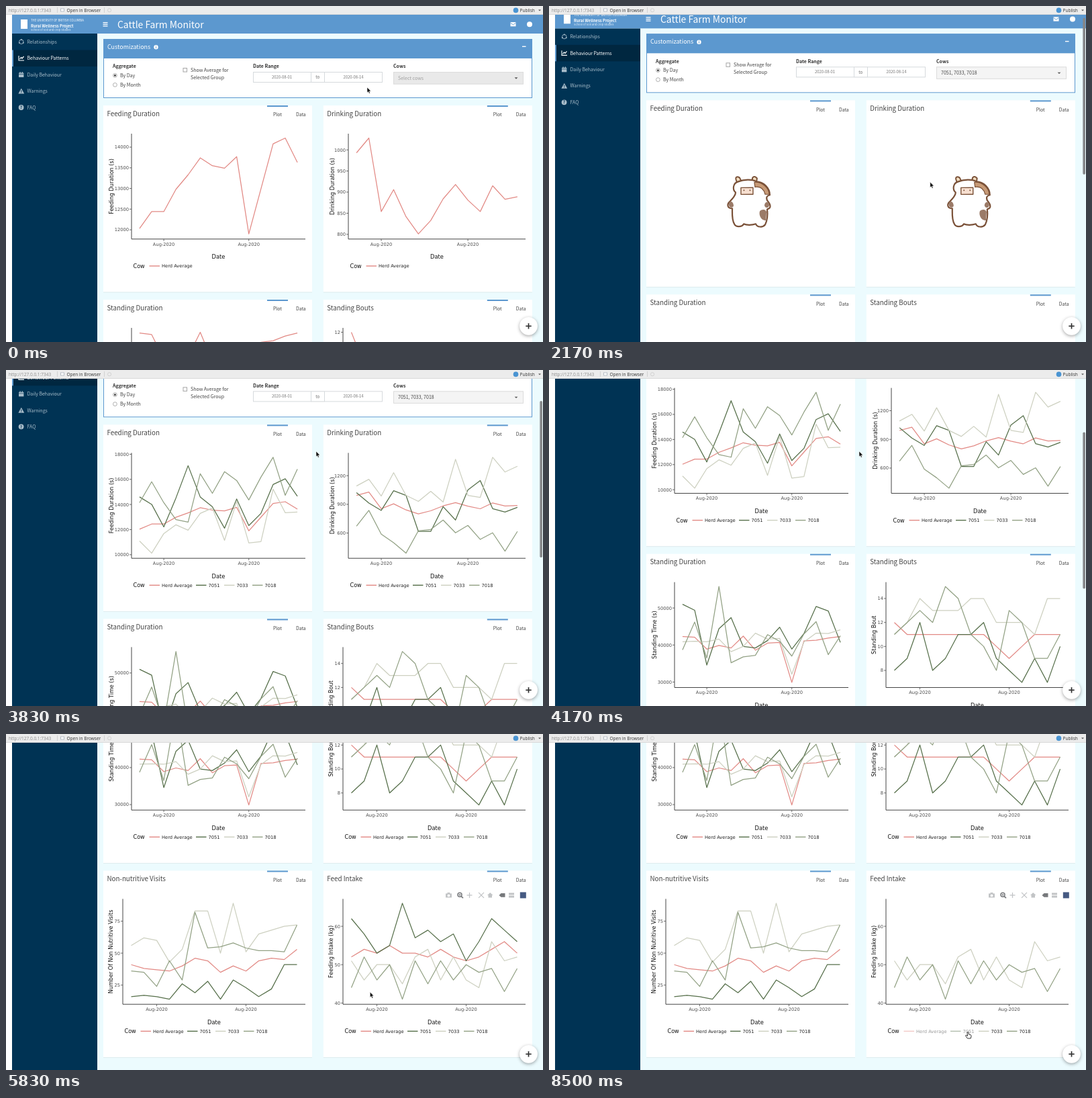
Write an HTML page with a canvas that moves like this. It is 800x500 px and loops after 8.88 s.

```html
<!DOCTYPE html>
<html lang="en">
<head>
<meta charset="utf-8">
<title>Cattle Farm Monitor</title>
<style>
html, body { margin: 0; width: 100%; height: 100%; overflow: hidden; background: #fff; }
canvas { display: block; width: 800px; height: 500px; }
</style>
</head>
<body>
<canvas id="stage" width="800" height="500"></canvas>
<script>
const ctx = document.getElementById('stage').getContext('2d');
const LOOP = 8880, STEP = 1000 / 6;
const UI = '"Noto Sans CJK SC", "Noto Sans CJK JP", "Noto Sans CJK", Lato, sans-serif';
const PLOT = '"DejaVu Sans", sans-serif';
const BAR = '"Open Sans", sans-serif';
const BLUE = '#5c98cf', NAVY = '#003354', PAGE = '#ecfbfe';
const COLORS = ['#e28984', '#566f4a', '#cdd0c0', '#92a184'];
const NAMES = ['Herd Average', '7051', '7033', '7018'];
const COWS = ('8015 7189 7159 7146 7065 7051 7043 7039 7037 7033 7030 7029 7027 ' +
  '7024 7023 7022 7019 7018 7010 6134 6131 6130 6129 6126 6050').split(' ');
const PICKS = [[830, '7051'], [1170, '7033'], [1670, '7018']];

const SCROLL = [[500, 0], [670, 15.5], [2000, 15.5], [2330, 0], [3330, 0], [3670, 30], [4000, 104],
  [4170, 164.5], [4500, 400], [4670, 484], [4830, 522], [5000, 522.6]];
const POINTER = [[0, 538, 121], [170, 560, 116], [500, 625, 106], [670, 625, 160], [830, 625, 217],
  [1170, 625, 276], [1330, 625, 287.5], [1670, 625, 390], [1830, 625, 390], [2330, 540, 200],
  [2670, 462, 121], [5170, 462, 121], [5670, 525, 330], [6000, 560, 439], [6500, 565, 440],
  [7000, 622, 443], [7170, 625, 444], [8000, 624.5, 443.5], [8500, 624, 443]];

const charts = [];
function chart(title, axis, left, steps, unit, ...data) {
  const i = charts.length;
  charts.push({ title, axis, left, steps, unit, data, col: i % 2, top: (i >> 1) * 289 });
}
chart('Feeding Duration', 'Feeding Duration (s)', 187, [5, 20], 100,
  [120.3, 124.4, 124.4, 129.8, 133.3, 137.4, 135.5, 134.9, 137.7, 119, 129.9, 140.8, 142.2, 136.3],
  [146, 140.1, 122.1, 145.2, 170.9, 146, 138.2, 121.1, 144.4, 123.2, 132.9, 155.9, 160.5, 146.5],
  [110.9, 101.2, 116.8, 123.8, 119.5, 132.9, 137.2, 111.4, 142.5, 109.3, 110.4, 152.2, 133.4, 133.9],
  [141.4, 158.1, 141.4, 128, 125.9, 164.5, 148.9, 166.1, 159.1, 143.6, 161.8, 177.6, 147.3, 168.2]);
chart('Drinking Duration', 'Drinking Duration (s)', 510, [50, 300], 1,
  [993, 1028, 854, 906, 842, 801, 833, 884, 918, 881, 854, 915, 883, 889],
  [1022, 914, 837, 1043, 994, 617, 617, 876, 736, 1050, 1148, 855, 820, 869],
  [1092, 1162, 987, 1231, 994, 931, 1036, 924, 1371, 994, 973, 1392, 1238, 1298],
  [673, 837, 589, 499, 390, 624, 638, 736, 603, 680, 534, 603, 411, 617]);
chart('Standing Duration', 'Standing Time (s)', 187, [5, 10], 1000,
  [42.3, 42.1, 38.9, 39.9, 39.2, 42.4, 38.6, 40.5, 40.7, 29.9, 41.1, 41.3, 41.9, 42.3],
  [51, 49.4, 34.6, 44.4, 47.4, 39.6, 39.2, 41.2, 44.8, 38.9, 43.1, 50.4, 49.2, 40.7],
  [40.9, 41, 40.9, 41.6, 38.2, 39.6, 43.2, 41.6, 41.8, 32.1, 40.8, 43.2, 43.1, 44.1],
  [38.7, 46.2, 36.5, 55.8, 35.2, 36.8, 37.2, 42.8, 41, 37, 43, 46.3, 37.4, 42.5]);
chart('Standing Bouts', 'Standing Bout', 502, [1, 2], 1,
  [12, 11, 11, 11, 11, 11, 11, 11, 10, 9, 10, 11, 11, 11],
  [8, 9, 12, 8, 9, 11, 11, 12, 9, 8, 7, 9, 7, 10],
  [11, 12, 14, 13, 13, 13, 14, 14, 12, 12, 12, 11, 14, 14],
  [11, 12, 13, 12, 15, 14, 11, 10, 8, 13, 12, 9, 9, 11]);
chart('Non-nutritive Visits', 'Number Of Non Nutritive Visits', 174, [5, 25], 1,
  [41, 38, 37, 36, 40, 46, 44, 35, 40, 36, 44, 46, 45, 53],
  [16, 17, 16, 14, 26, 19, 28, 14, 29, 23, 16, 22, 41, 41],
  [56, 62, 60, 43, 53, 83, 83, 50, 89, 51, 65, 68, 71, 72],
  [36, 35, 24, 44, 29, 82, 54, 55, 58, 54, 52, 52, 51, 72]);
chart('Feed Intake', 'Feeding Intake (kg)', 502, [1, 10], 1,
  [52, 54, 53, 55, 53, 53, 52, 54, 52, 51, 52, 54, 56, 53],
  [62, 58, 53, 55, 66, 57, 59, 56, 58, 51, 56, 62, 59, 56],
  [51, 46, 50, 50, 45, 52, 54, 46, 52, 46, 44, 56, 51, 52],
  [44, 52, 46, 50, 41, 51, 45, 51, 46, 50, 48, 49, 43, 49]);

function track(keys, t, k = 1) {
  if (t <= keys[0][0]) return keys[0][k];
  for (let i = 1; i < keys.length; i++) {
    const a = keys[i - 1], b = keys[i];
    if (t < b[0]) return a[k] + (b[k] - a[k]) * (t - a[0]) / (b[0] - a[0]);
  }
  return keys[keys.length - 1][k];
}

// Text is placed by the vertical centre of its capitals.
function text(s, x, y, size, color, font = UI, align = 'left', weight = 400) {
  ctx.font = `${weight} ${size}px ${font}`;
  ctx.fillStyle = color;
  ctx.textAlign = align;
  ctx.fillText(s, x, y + size * 0.36);
}
const bold = (s, x, y, size, color) => text(s, x, y, size, color, UI, 'left', 700);

function rect(x, y, w, h, fill, stroke) {
  if (fill) { ctx.fillStyle = fill; ctx.fillRect(x, y, w, h); }
  if (stroke) { ctx.strokeStyle = stroke; ctx.lineWidth = 1; ctx.strokeRect(x + .5, y + .5, w - 1, h - 1); }
}
function disc(x, y, r, fill, stroke, width = 1) {
  ctx.beginPath();
  ctx.arc(x, y, r, 0, Math.PI * 2);
  if (fill) { ctx.fillStyle = fill; ctx.fill(); }
  if (stroke) { ctx.strokeStyle = stroke; ctx.lineWidth = width; ctx.stroke(); }
}
function line(pts, color, width = 1) {
  ctx.beginPath();
  pts.forEach(p => ctx.lineTo(p[0], p[1]));
  ctx.strokeStyle = color;
  ctx.lineWidth = width;
  ctx.stroke();
}
function poly(pts, fill) {
  ctx.beginPath();
  pts.forEach(p => ctx.lineTo(p[0], p[1]));
  ctx.closePath();
  ctx.fillStyle = fill;
  ctx.fill();
}
function shape(d, fill, stroke, width) {
  const p = new Path2D(d);
  if (fill) { ctx.fillStyle = fill; ctx.fill(p); }
  if (stroke) { ctx.strokeStyle = stroke; ctx.lineWidth = width; ctx.stroke(p); }
}
const caret = (x, y, w, color) => poly([[x - w, y - w / 2], [x + w, y - w / 2], [x, y + w / 2]], color);

function topBar() {
  rect(0, 0, 800, 13, '#ececec');
  rect(0, 12, 800, 1, '#d9d9d9');
  text('http://127.0.0.1:7343', 4, 6.3, 6.5, '#8b8b8b', BAR);
  rect(76, 2, 1, 8, '#d2d2d2');
  rect(81, 3.5, 6, 5, '#fff', '#b5bcc4');
  text('Open in Browser', 90.5, 6.3, 6.5, '#333', BAR);
  rect(146, 2, 1, 8, '#d2d2d2');
  disc(154, 6.3, 2.6, null, '#d2d2d2');
  disc(759.5, 6.4, 3.8, '#4a94d2');
  text('Publish', 765.5, 6.3, 6.5, '#333', BAR);
  caret(795, 6.6, 2, '#555');
}

function header() {
  rect(9, 13, 791, 28, BLUE);
  rect(22, 20, 10, 14, '#fff');
  text('THE UNIVERSITY OF BRITISH COLUMBIA', 37, 21, 4.3, '#fff');
  bold('Rural Wellness Project', 37, 29.5, 5.8, '#fff');
  text('School of Soil and Crop Studies', 37, 35.6, 4.1, '#e4eff8');
  for (let i = 0; i < 3; i++) rect(144.5, 24 + i * 2.6, 7, 1.3, '#fff');
  text('Cattle Farm Monitor', 166, 28, 13.9, '#fff');
  rect(751.5, 24, 8, 6.3, '#fff');
  line([[751.5, 25], [755.5, 28], [759.5, 25]], BLUE, .9);
  disc(780, 27.2, 4, '#fff');
}

function sidebar() {
  rect(9, 41, 127, 1000, NAVY);
  rect(9, 65.5, 127, 24.5, '#002740');
  rect(9, 65.5, 2, 24.5, BLUE);
  const items = ['Relationships', 'Behaviour Patterns', 'Daily Behaviour', 'Warnings', 'FAQ'];
  items.forEach((s, i) => text(s, 31.5, 53.3 + i * 24.45, 7, i === 1 ? '#fff' : '#a9bdca'));
  const c = '#a9bdca';
  disc(22.8, 53.3, 3.2, null, c, .9);
  [[0, -3.2], [3, 1.5], [-3, 1.5]].forEach(p => disc(22.8 + p[0], 53.3 + p[1], 1, c));
  line([[19, 74], [19, 81], [27, 81]], '#fff', 1.1);
  line([[20.5, 79], [22.5, 76.5], [24, 78], [26.5, 75]], '#fff', 1.2);
  rect(19, 99.5, 7.4, 6.5, c);
  rect(20.5, 98, 1.2, 2, c);
  rect(23.7, 98, 1.2, 2, c);
  line([[19, 101.5], [26.4, 101.5]], NAVY, .6);
  poly([[22.8, 122.4], [27.2, 130.4], [18.4, 130.4]], c);
  rect(22.3, 125.2, 1, 2.6, NAVY);
  rect(22.3, 128.4, 1, 1, NAVY);
  disc(22.6, 151, 3.9, c);
  text('?', 22.6, 151, 6, NAVY, UI, 'center', 700);
}

function picked(t) {
  return PICKS.filter(p => t >= p[0]).map(p => p[1]);
}

function filters(t) {
  const open = t >= 500 && t < 2000, cows = picked(t);
  rect(145, 49, 639, 88, '#fff', BLUE);
  rect(145, 49, 639, 29, BLUE);
  text('Customizations', 151, 60.6, 8.95, '#fff');
  disc(223.5, 61.3, 3.2, '#fff');
  rect(223, 60.8, 1, 2.3, BLUE);
  rect(223, 59.2, 1, 1, BLUE);
  rect(769, 59.6, 5.5, 1.4, '#fff');
  bold('Aggregate', 159, 89.7, 7, '#333');
  ['By Day', 'By Month'].forEach((s, i) => {
    const y = 103.3 + i * 14;
    disc(162.4, y, 2.9, '#fff', '#9a9a9a', .8);
    if (!i) disc(162.4, y, 1.5, '#444');
    text(s, 170, y, 7, '#444');
  });
  rect(263.5, 92, 6.5, 6.5, '#fff', '#a5a5a5');
  text('Show Average for', 275, 95.2, 7, '#444');
  text('Selected Group', 275, 106, 7, '#444');
  bold('Date Range', 368, 89.7, 7, '#333');
  rect(368, 98, 193, 16, '#fff', '#d6dadd');
  rect(454, 98, 21, 16, '#fff', '#d6dadd');
  text('2020-08-01', 411, 106, 5.9, '#777', UI, 'center');
  text('to', 464.2, 106, 6.2, '#666', UI, 'center');
  text('2020-08-14', 517.5, 106, 5.9, '#777', UI, 'center');
  bold('Cows', 577, 89.7, 7, '#333');
  const fill = open ? '#e4e4e4' : t < 500 ? '#e9e9e9' : '#f4f4f4';
  rect(577, 98, 192 + (open ? 0 : 2), 18.5, fill, open ? '#b0bcc4' : '#dcdcdc');
  text(cows.length ? cows.join(', ') : 'Select cows', 584, 107.3, 7, cows.length ? '#444' : '#a0a0a0');
  caret(760, 107.5, 2.4, '#555');
}

function menu(t) {
  const cows = picked(t), active = cows[cows.length - 1];
  rect(578, 117, 191, 600, '#fff', '#e2e4e5');
  rect(583, 123, 181, 17, '#f5f5f5', '#e0e0e0');
  rect(673, 123, 1, 17, '#e0e0e0');
  text('Select All', 627.5, 131.5, 6.2, '#444', UI, 'center');
  text('Deselect All', 718, 131.5, 6.2, '#444', UI, 'center');
  rect(583, 141, 181, 13, '#f3f3f3');
  text('48 cows with data in date range', 589, 148.5, 5.9, '#777');
  COWS.forEach((id, i) => {
    const y = 162 + i * 14.45, on = id === active;
    if (on) rect(578, y - 7.3, 191, 14.5, '#e2e2e2');
    text(id, 595, y, 7, on ? '#333' : '#777');
    if (cows.includes(id)) line([[747.8, y], [750.2, y + 2.3], [755, y - 2.5]], on ? '#222' : '#777', 1.7);
  });
}

function mascot(cx, cy, t) {
  const ink = '#7a5138', tan = '#c79a76';
  ctx.save();
  ctx.translate(cx, cy);
  ctx.rotate(Math.sin((t - 1330) / 260) * .04);
  ctx.lineJoin = 'round';
  shape('M-17-28C-22-36-19-39-14-36L-11-30ZM5-31C4-38 9-39 12-35L11-28Z', '#f0dcc0', ink, 2);
  shape('M-16-30C-8-33 4-34 11-30C22-30 31-20 31-10C27-9 25-7 27-2C33 5 33 10 27 11' +
    'C28 20 27 28 24 34C20 39 12 38 10 33C4 35-4 35-8 33C-11 38-20 38-22 33C-26 26-25 18-25 10' +
    'C-32 10-34 4-28-1C-24-6-20-9-20-14C-25-18-24-28-16-30Z', '#fff', ink, 2.2);
  shape('M8-29C20-30 30-20 30-11L24-11C22-20 16-23 9-22Z', tan, ink, 1.2);
  shape('M-30 2C-27-3-23 1-23 6C-25 10-31 9-30 2ZM30 3C27-2 23 1 23 6C25 11 31 9 30 3Z', '#9b7b68');
  shape('M16 14C20 10 26 12 26 16L25 28C18 28 14 20 16 14Z', '#9b7b68');
  shape('M-12-21L6-21L6-11L-12-11Z', '#f7dfd0', ink, 1.4);
  disc(-7.5, -17, 1, ink);
  disc(1.5, -17, 1, ink);
  ctx.restore();
}

function modeBar(y) {
  const light = '#c2c4c6', dark = '#77797c';
  rect(655, y - 2.5, 9, 6, light);
  rect(657.5, y - 4, 4, 2, light);
  disc(659.5, y + .5, 1.9, '#fff');
  disc(676, y - .6, 3, null, dark, 1.5);
  line([[678, y + 1.5], [681, y + 4.2]], dark, 1.7);
  line([[674.5, y - .6], [677.5, y - .6]], dark, 1);
  line([[676, y - 2], [676, y + .9]], dark, 1);
  line([[686.5, y], [694.5, y]], light, 1.3);
  line([[690.5, y - 4], [690.5, y + 4]], light, 1.3);
  line([[704, y - 4], [712, y + 4]], light, 1.2);
  line([[712, y - 4], [704, y + 4]], light, 1.2);
  poly([[717, y], [721.2, y - 4], [725.5, y], [724, y], [724, y + 3.6], [718.5, y + 3.6], [718.5, y]], light);
  poly([[734.5, y], [737.5, y - 2.8], [743.5, y - 2.8], [743.5, y + 2.8], [737.5, y + 2.8]], dark);
  rect(749, y - 3.5, 8, 3, light);
  rect(749, y + .6, 8, 3, light);
  rect(765.8, y - 4.5, 9, 9, '#465a82');
}

function drawPlot(c, count, off) {
  const data = c.data.slice(0, count), all = data.flat();
  const lo = Math.min(...all), hi = Math.max(...all), pad = (hi - lo) * .05;
  const right = c.col ? 774 : 446, span = right - c.left;
  const X = i => c.left + span * (.046 + .908 * i / 13);
  const Y = v => c.top + 339.2 - (v - lo) / (hi - lo) * 142.7;
  const base = c.top + 346.8, ink = '#4d4d4d', mid = (c.left + right) / 2;
  const step = c.steps[count > 1 ? 1 : 0];

  for (let v = Math.ceil((lo - pad) / step) * step; v <= hi + pad; v += step) {
    line([[c.left - 3, Y(v)], [c.left, Y(v)]], ink, .8);
    text(Math.round(v * c.unit), c.left - 4, Y(v), 6.7, ink, PLOT, 'right');
  }
  [2, 9].forEach(i => {
    line([[X(i), base], [X(i), base + 3]], ink, .8);
    text('Aug-2020', X(i), c.top + 354.3, 6.7, ink, PLOT, 'center');
  });
  line([[c.left, c.top + 190], [c.left, base], [right, base]], '#444', 1);
  text('Date', mid, c.top + 373.3, 8.3, '#111', PLOT, 'center');
  ctx.save();
  ctx.translate(c.col ? (c.left > 505 ? 486 : 484) : (c.left > 180 ? 157 : 156), c.top + 268.5);
  ctx.rotate(-Math.PI / 2);
  text(c.axis, 0, 0, 8.1, '#111', PLOT, 'center');
  ctx.restore();

  ctx.lineJoin = 'round';
  data.forEach((s, k) => {
    if (!off.includes(k)) line(s.map((v, i) => [X(i), Y(v)]), COLORS[k], 1.25);
  });

  const y = c.top + 386.9, x = c.left + 2.5;
  text('Cow', x, y, 8.1, '#111', PLOT);
  data.forEach((s, k) => {
    const lx = x + 24 + (k && 69.5 + (k - 1) * 42);
    ctx.globalAlpha = off.includes(k) ? .45 : 1;
    line([[lx, y], [lx + 15.5, y]], COLORS[k], 1.4);
    text(NAMES[k], lx + 18.5, y, 6.7, '#222', PLOT);
    ctx.globalAlpha = 1;
  });
}

function card(c, t) {
  const dx = c.col * 327.8, y = c.top;
  rect(145 + dx, y + 148, 311, 278, '#fff');
  rect(145 + dx, y + 425.5, 311, 1, '#dcebee');
  rect(389 + dx, y + 148, 31, 2, BLUE);
  text(c.title, 150.5 + dx, y + 160, 9.8, '#444');
  text('Plot', 404.4 + dx, y + 161.7, 6.9, '#444', UI, 'center');
  text('Data', 439.3 + dx, y + 161.7, 6.9, '#444', UI, 'center');
  if (t >= 1000 && t < 2660) return mascot(298 + dx, y + 299, t);
  const off = [], last = c === charts[5];
  if (last && t >= 6490) off.push(0);
  if (last && t >= 7660) off.push(1);
  drawPlot(c, t < 2660 ? 1 : 4, off);
  if (last && t >= 5660) modeBar(y + 184.5);
}

function toast(t) {
  ctx.globalAlpha = Math.min(1, (t - 6300) / 500) * .95;
  rect(690, 41.5, 98.5, 42.5, '#8794b3');
  ['Double-click on', 'legend to isolate', 'one trace'].forEach((s, i) =>
    text(s, 695.5, 52 + i * 10.5, 7.3, '#fff', BAR));
  line([[773, 51], [778, 56]], '#fff', 1.4);
  line([[778, 51], [773, 56]], '#fff', 1.4);
  ctx.globalAlpha = 1;
}

function addButton() {
  ctx.save();
  ctx.shadowColor = 'rgba(0,0,0,.35)';
  ctx.shadowBlur = 5;
  ctx.shadowOffsetY = 1.5;
  disc(778.5, 476.3, 13.4, '#fff');
  ctx.restore();
  rect(774.3, 475.5, 8.4, 1.7, '#333');
  rect(777.65, 472.1, 1.7, 8.4, '#333');
}

function pointer(t) {
  const hand = t >= 660 && t < 1990 || t >= 5990;
  ctx.save();
  ctx.translate(track(POINTER, t), track(POINTER, t, 2));
  ctx.lineJoin = 'round';
  if (hand) {
    shape('M-1 1Q0-.6 1 1L1.4 4L4 4.6Q5.4 5 5 7L4.2 10L-.6 10L-3.4 6.2Q-3.4 4.6-1.8 5.4L-.4 6.4Z',
      '#fff', '#333', 1);
  } else {
    shape('M0 0L0 8L1.8 6.4L3 9.2L4.4 8.6L3.2 5.9L5.6 5.7Z', '#111', '#fff', .5);
  }
  ctx.restore();
}

function draw(t) {
  const scroll = track(SCROLL, t);
  rect(0, 0, 800, 500, '#fff');
  ctx.save();
  ctx.translate(0, -scroll);
  rect(136, 13, 664, 1100, PAGE);
  sidebar();
  header();
  filters(t);
  charts.forEach(c => card(c, t));
  if (t >= 500 && t < 2000) menu(t);
  ctx.restore();
  topBar();
  addButton();
  if (t >= 660 && t < 5490) {
    ctx.beginPath();
    ctx.roundRect(795.3, 14 + scroll * .481, 3.7, 233, 1.8);
    ctx.fillStyle = '#858789';
    ctx.fill();
  }
  if (t >= 6490 && t < 8490) toast(t);
  pointer(t);
}

const start = performance.now();
function tick() {
  const t = (performance.now() - start) % LOOP;
  draw(Math.floor((t + 4) / STEP) * STEP);
  requestAnimationFrame(tick);
}
tick();
</script>
</body>
</html>
```
